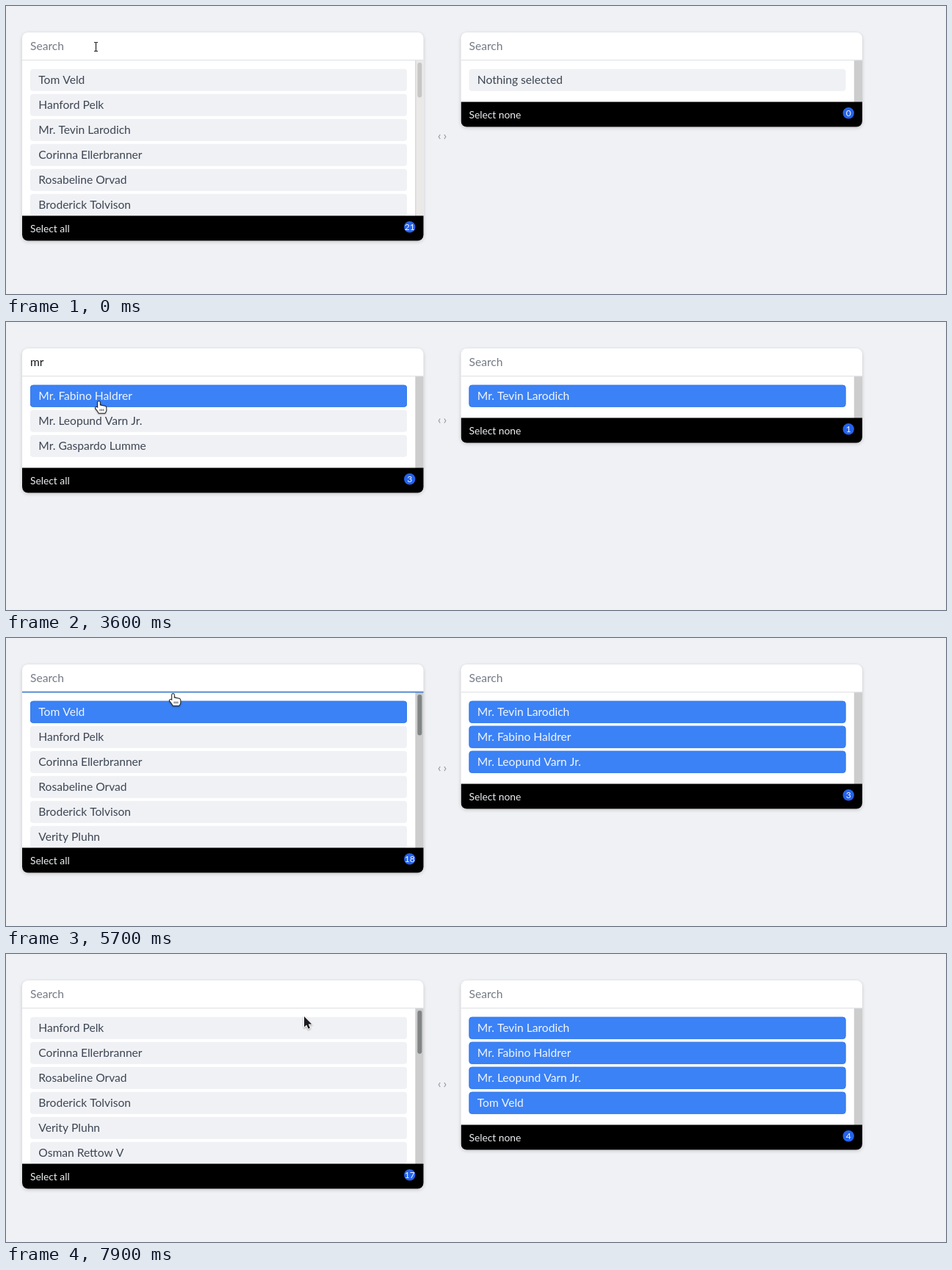
An HTML page with a canvas for the animation above (8 s loop, 1280 by 392 pixels).

```html
<!DOCTYPE html>
<html lang="en">
<head>
<meta charset="utf-8">
<title>Transfer list</title>
<style>
html, body { margin: 0; width: 100%; height: 100%; overflow: hidden; background: #f0f1f5; }
canvas { display: block; }
</style>
</head>
<body>
<canvas id="stage" width="1280" height="392"></canvas>
<script>
const ctx = document.getElementById('stage').getContext('2d');
const LOOP = 8000, TOTAL = 21, TOP = 36, LIST_TOP = 74, ROW = 34;
const FONT = 'Lato, "Open Sans", sans-serif';

const people = [
  'Tom Veld', 'Hanford Pelk', 'Mr. Tevin Larodich', 'Corinna Ellerbranner',
  'Rosabeline Orvad', 'Broderick Tolvison', 'Verity Pluhn', 'Osman Rettow V',
  'Mr. Fabino Haldrer', 'Mr. Leopund Varn Jr.', 'Mr. Gaspardo Lumme'
];
const picks = [[3200, people[2]], [3700, people[8]], [4000, people[9]], [7600, people[0]]];

// Pointer stops: time, x, y, shape
const pointer = [
  [0, 122, 55, 'beam'], [2800, 123, 64, 'beam'], [2900, 125, 80, 'hand'],
  [3000, 128, 96, 'hand'], [3100, 130, 108, 'hand'], [3400, 129, 116, 'hand'],
  [4100, 122, 96, 'hand'], [4200, 108, 62, 'beam'], [4300, 80, 56, 'beam'],
  [4500, 0, 0, 'none'], [5700, 230, 84, 'hand'], [5800, 430, 122, 'hand'],
  [5900, 640, 162, 'hand'], [6100, 710, 140, 'hand'], [6200, 819, 112, 'hand'],
  [6300, 805, 104, 'hand'], [6600, 780, 104, 'hand'], [6700, 738, 104, 'hand'],
  [6900, 600, 112, 'arrow'], [7000, 400, 118, 'hand'], [7100, 220, 114, 'hand'],
  [7200, 155, 108, 'hand'], [7300, 141, 105, 'hand'], [7800, 290, 101, 'hand'],
  [7900, 410, 93, 'arrow']
];

const within = (t, ...spans) => spans.some(([from, to]) => t >= from && t < to);

function stateAt(t) {
  const picked = picks.filter(p => t >= p[0]).map(p => p[1]);
  const filtered = within(t, [1700, 5200]);
  const rest = people.filter(p => !picked.includes(p) && (!filtered || p.startsWith('Mr')));
  return {
    picked, rest,
    count: filtered ? rest.length : TOTAL - picked.length,
    query: within(t, [1400, 1500]) ? 'm' : within(t, [1500, 5100]) ? 'mr' : '',
    selected: within(t, [4500, 5100]),
    focused: within(t, [500, 3200], [4400, 7300]),
    caret: within(t, [500, 1700], [4400, 4500], [5100, 5500], [6600, 6900]),
    hover: within(t, [2900, 4200], [5700, 5900], [7000, 7900]),
    idle: t < 500
  };
}

function text(str, x, y, color, size = 15.6, align = 'left') {
  ctx.font = `${size}px ${FONT}`;
  ctx.textAlign = align;
  ctx.fillStyle = color;
  ctx.fillText(str, x, y);
}

function rect(x, y, w, h, color) {
  ctx.fillStyle = color;
  ctx.fillRect(x, y, w, h);
}

function rounded(x, y, w, h, r, color) {
  ctx.beginPath();
  ctx.roundRect(x, y, w, h, r);
  ctx.fillStyle = color;
  ctx.fill();
}

function row(x, y, label, active) {
  rounded(x, y, 513, 30, 4, active ? '#3b82f6' : '#f0f1f5');
  if (active) {
    ctx.beginPath();
    ctx.roundRect(x + .5, y + .5, 512, 29, 3.5);
    ctx.strokeStyle = '#3a7be4';
    ctx.lineWidth = 1;
    ctx.stroke();
  }
  text(label, x + 11.3, y + 20.4, active ? '#f1f5fb' : '#3d4653');
}

function scrollbar(x, bottom, count, overflow, idle) {
  rect(x, LIST_TOP, 12, bottom - LIST_TOP, idle ? '#ebe9e8' : '#cdcdcd');
  if (idle) rect(x, LIST_TOP, 1, bottom - LIST_TOP, '#d2d1d0');
  if (overflow) rounded(x + 3, 77, 6, 1000 / count, 3, idle ? '#c6c6c6' : '#818484');
}

function searchBox(x, s) {
  const tx = x + 11;
  ctx.font = `15.6px ${FONT}`;
  const width = ctx.measureText(s.query).width;
  if (s.selected) rect(tx, 44, width, 21, '#3584e4');
  text(s.query || 'Search', tx, 60, s.selected ? '#fff' : s.query ? '#15181d' : '#747a85');
  if (s.caret) rect(Math.round(tx + width) + 1, 44, 1, 21, '#15181d');
  if (s.focused) rect(x, 72.7, 547, 1.8, '#4683cf');
  else rect(x, 73, 547, 1.3, '#e2e4e9');
}

function panelBottom(rows) {
  return Math.min(286, 97 + ROW * rows);
}

function panel(x, s) {
  const foot = panelBottom(Math.max(1, s.count));
  const height = foot + 33.5 - TOP;
  ctx.save();
  ctx.shadowColor = 'rgba(0,0,0,.18)';
  ctx.shadowBlur = 5;
  ctx.shadowOffsetY = 1.5;
  rounded(x, TOP, 546.5, height, 8, '#fff');
  ctx.restore();

  ctx.save();
  ctx.beginPath();
  ctx.roundRect(x, TOP, 546.5, height, 8);
  ctx.clip();
  s.rows.slice(0, 6).forEach((label, i) => row(x + 11, 85.7 + ROW * i, label, s.active(i)));
  scrollbar(x + 535.3, foot, s.count, foot === 286, s.idle);
  searchBox(x, s);
  rect(x, foot - .5, 547, 36, '#000');
  text(s.action, x + 11, foot + 21.5, '#eef0f3', 13.8);
  ctx.beginPath();
  ctx.arc(x + 527.7, foot + 14.8, 7.7, 0, Math.PI * 2);
  ctx.fillStyle = '#2563eb';
  ctx.fill();
  text(s.count, x + 527.7, foot + 18.8, '#f1f5fb', 12, 'center');
  ctx.restore();
}

function chevrons(y) {
  ctx.strokeStyle = '#9296a0';
  ctx.lineWidth = 1.1;
  for (const side of [-1, 1]) {
    const x = 594 + side * 4.8;
    ctx.beginPath();
    ctx.moveTo(x - side * 2, y - 3);
    ctx.lineTo(x, y);
    ctx.lineTo(x - side * 2, y + 3);
    ctx.stroke();
  }
}

const shapes = {
  hand: new Path2D('M-3.8 1V-6.5Q-3.8-8-2.5-8T-1.2-6.5V-2.2Q.2-3.2 1.6-1.8Q3-2.6 4.2-1.2Q5.5-2 6.8-.6Q7.5 0 7.3 2V4Q7 6 5.6 7.8H-2.5Q-3.5 5.5-6.4 2.3Q-7.8.7-6.5.1Q-5.3-.4-3.8 1Z'),
  arrow: new Path2D('M-4-8V6.6L-.7 3.5L1.6 8.8L4 7.7L1.8 2.6H6.4Z'),
  beam: new Path2D('M-2.5-6H-.8Q0-6 0-5Q0-6 .8-6H2.5M0-5V5M-2.5 6H-.8Q0 6 0 5Q0 6 .8 6H2.5')
};

function outline(path, color, width) {
  ctx.strokeStyle = color;
  ctx.lineWidth = width;
  ctx.stroke(path);
}

function drawPointer(t) {
  const [, x, y, kind] = pointer.findLast(p => t >= p[0]);
  if (kind === 'none') return;
  const path = shapes[kind];
  ctx.save();
  ctx.translate(x, y);
  ctx.lineJoin = 'round';
  if (kind === 'beam') {
    ctx.translate(.5, .5);
    outline(path, '#fff', 3);
    outline(path, '#222', 1.2);
  } else {
    const hand = kind === 'hand';
    ctx.shadowColor = 'rgba(0,0,0,.35)';
    ctx.shadowBlur = 2;
    ctx.shadowOffsetY = 1;
    outline(path, hand ? '#222' : '#fff', 2);
    ctx.shadowColor = 'transparent';
    ctx.fillStyle = hand ? '#fff' : '#1c1c20';
    ctx.fill(path);
    if (hand) outline(new Path2D('M-.8 2.5V5.2M1.5 2.5V5.2M3.8 2.5V5.2'), '#222', .9);
  }
  ctx.restore();
}

function draw(t) {
  const s = stateAt(t);
  const chosen = s.picked.length;
  rect(0, 0, 1280, 392, '#f0f1f5');
  panel(22, { ...s, rows: s.rest, action: 'Select all', active: i => s.hover && i === 0 });
  panel(619.5, {
    rows: chosen ? s.picked : ['Nothing selected'], count: chosen, query: '',
    action: 'Select none', active: () => chosen > 0
  });
  chevrons((TOP + panelBottom(Math.max(s.count, chosen)) + 34) / 2);
  drawPointer(t);
}

function tick() {
  draw(performance.now() % LOOP);
  requestAnimationFrame(tick);
}
tick();
</script>
</body>
</html>
```
